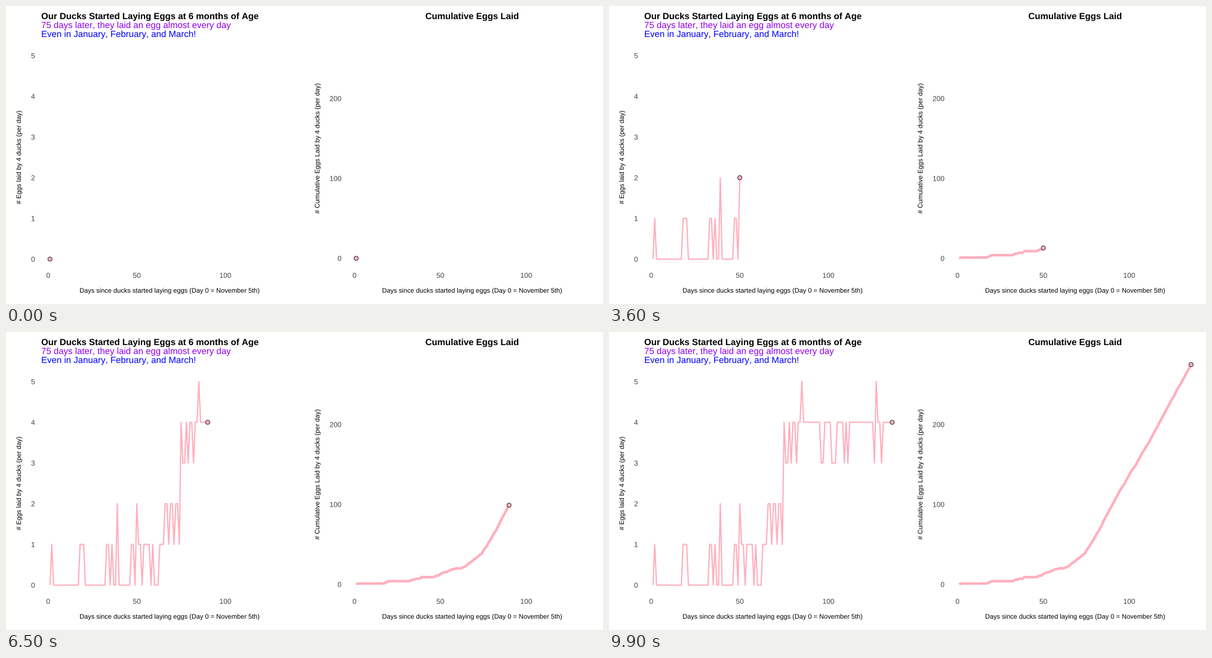
Write a matplotlib script that moves like this. It is 1000 px wide and 500 px high and loops after 10 s.

```python
import matplotlib.pyplot as plt
import numpy as np
from matplotlib.animation import FuncAnimation
from matplotlib.patches import Circle, PathPatch
from matplotlib.textpath import TextPath
from matplotlib.transforms import Affine2D

W, H, DPI = 1000, 500, 100
FRAMES, INTERVAL = 100, 100
LAST_DAY = 136
PT = 72 / DPI  # points per pixel

PINK, PURPLE, BLUE, GREY = "#FFAFBD", "#8F00EA", "#0000FF", "#444444"

plt.rcParams.update({
    "path.simplify": False,
    "text.kerning_factor": 6,  # plain advances, no pair kerning
})

# Days that stray from the usual rate of their phase
EARLY = {2, 18, 19, 20, 33, 34, 36, 47, 48, 51, 52, *range(54, 58), 59}
DOUBLE = {39, 50}
SLOW = {76, 77, 79, 82, 96, 97, 102, 103, 104, 109, 111, 126, 130}
BUMPER = {85, 127}


def eggs_on(day):
    if day < 63:
        return (day in EARLY) + 2 * (day in DOUBLE)
    if day < 75:
        return 1 + (day > 65 and day % 3 != 2)
    return 4 - (day in SLOW) + (day in BUMPER)


days = np.arange(1, LAST_DAY + 1)
eggs = np.array([eggs_on(d) for d in days])

fig = plt.figure(figsize=(W / DPI, H / DPI), dpi=DPI, facecolor="white")
ax = fig.add_axes([0, 0, 1, 1])
ax.set(xlim=(0, W), ylim=(H, 0))
ax.axis("off")


def outline(text, size, weight):
    font = {"family": "Liberation Sans", "weight": weight}
    return TextPath((0, 0), text, size=size, prop=font)


def advance(text, size, weight):
    def span(s):
        return outline(s, size, weight).get_extents().width
    return span(f"|{text}|") - span("||")


def label(x, y, text, size, color="black", align=0.0, weight="normal",
          angle=0):
    """Text with its baseline at y; align 0 is left, 0.5 centre, 1 right."""
    shift = -align * advance(text, size, weight)
    place = (Affine2D().translate(shift, 0).rotate_deg(angle)
             .scale(1, -1).translate(x, y))
    path = outline(text, size, weight).transformed(place)
    ax.add_patch(PathPatch(path, fc=color, lw=0, snap=False))


class Chart:
    """One panel: fixed labels, a growing line and a dot at its tip."""

    def __init__(self, values, x0, dx, y0, dy, width, ticks, tick_x):
        self.x = x0 + dx * days
        self.y = y0 - dy * values
        for day in (0, 50, 100):
            label(x0 + dx * day, 456, str(day), 12, GREY, 0.5)
        for v in ticks:
            label(tick_x, y0 - dy * v + 4.3, str(v), 12, GREY, 1)
        self.line, = ax.plot([], [], color=PINK, lw=width * PT, snap=False,
                             solid_capstyle="butt", solid_joinstyle="round")
        self.dot = Circle((0, 0), 3.55, fc=PINK, ec="black", lw=0.8 * PT,
                          snap=False, zorder=3)
        ax.add_patch(self.dot)

    def show(self, n):
        self.line.set_data(self.x[:n], self.y[:n])
        self.dot.center = self.x[n - 1], self.y[n - 1]
        return self.line, self.dot


daily = Chart(eggs, 70.7, 2.968, 424.7, 68.3, 2.13, range(6), 48.6)
total = Chart(np.cumsum(eggs), 583.7, 2.877, 423.4, 1.341, 4.27,
              (0, 100, 200), 562)

label(59, 22, "Our Ducks Started Laying Eggs at 6 months of Age", 15,
      weight="bold")
label(59, 37, "75 days later, they laid an egg almost every day", 15, PURPLE)
label(59, 52, "Even in January, February, and March!", 15, BLUE)
label(780.8, 22, "Cumulative Eggs Laid", 15, align=0.5, weight="bold")

for x in (274, 780.8):
    label(x, 481, "Days since ducks started laying eggs (Day 0 = November 5th)",
          11, align=0.5)
label(25, 254, "# Eggs laid by 4 ducks (per day)", 11, align=0.5, angle=90)
label(525, 239, "# Cumulative Eggs Laid by 4 ducks (per day)", 11, align=0.5,
      angle=90)


def update(i):
    # Each day appears on the frame nearest to its time
    n = 1 + int((i + 0.5) * (LAST_DAY - 1) / (FRAMES - 1))
    return daily.show(n) + total.show(n)


anim = FuncAnimation(fig, update, frames=FRAMES, interval=INTERVAL,
                     init_func=lambda: update(0), repeat=True,
                     repeat_delay=0, blit=False)
plt.show()
```
